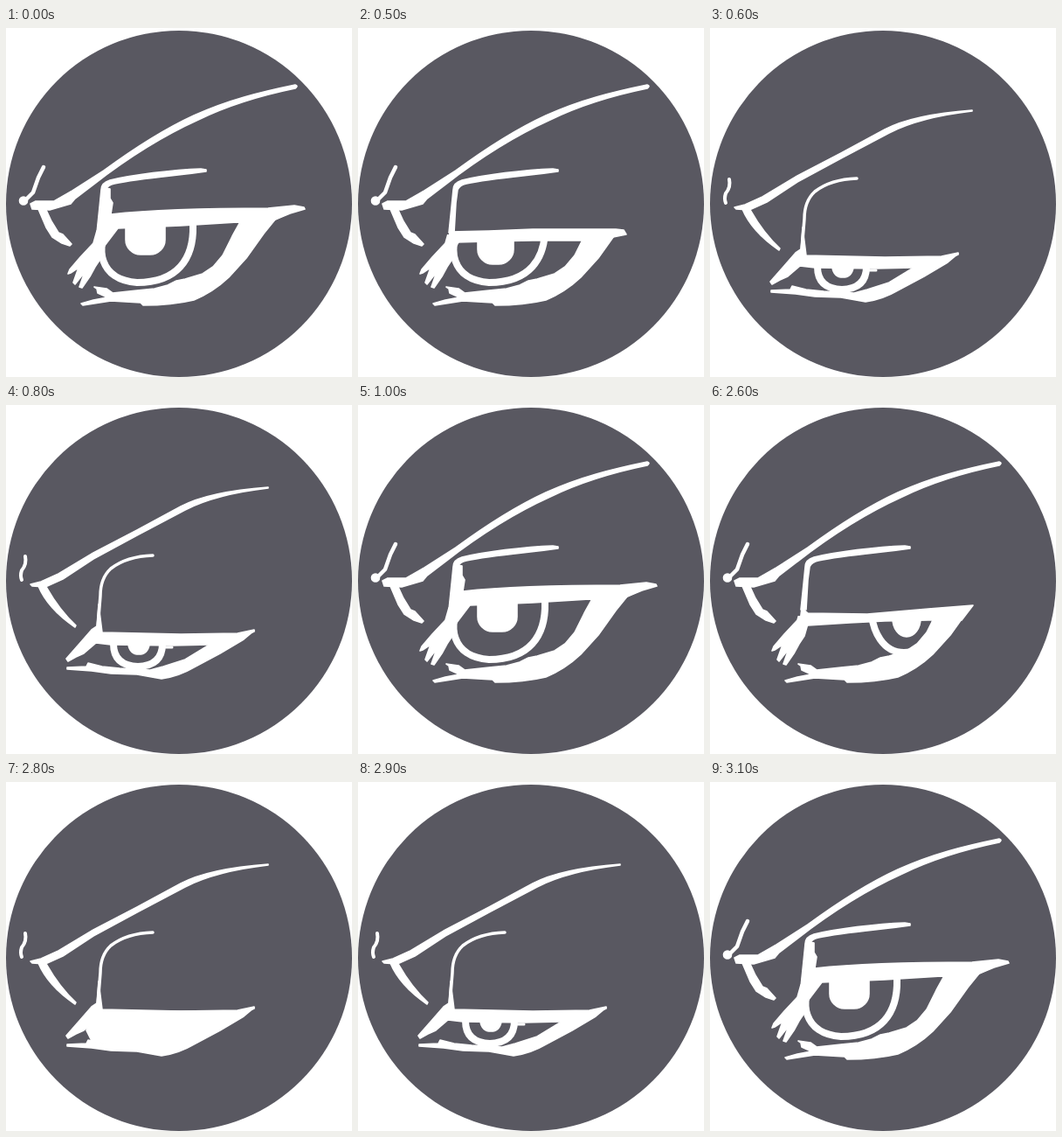
Write an HTML page that moves like this. It is 396 px wide and 399 px high and loops after 4100 ms.

```html
<!DOCTYPE html>
<html lang="en">
<head>
<meta charset="utf-8">
<title>Blinking eye</title>
<style>
  html, body { margin: 0; height: 100%; overflow: hidden; background: #fff; }
  svg { display: block; width: 100vw; height: 100vh; }
  .white { fill: #fff; stroke: #fff; stroke-width: 1.6; stroke-linejoin: round; stroke-linecap: round; }
  .line { fill: none; }
</style>
</head>
<body>
<svg viewBox="0 0 396 399">
  <clipPath id="below"><rect id="edge" width="396" height="399"/></clipPath>
  <circle cx="198" cy="201" r="198" fill="#595861"/>

  <g id="raised" class="white">
    <path class="line" stroke-width="4.500" d="M43 159L37 171L31 188L21 198"/>
    <circle cx="20" cy="197.500" r="4.500"/>
    <path d="M28 201L34 198L55 198L76 186L112 163C142 141 178 117 215 100C255 82 292 73 331 65Q335 66 331 69C292 77 255 88 220 105C180 123 140 148 100 179L79 195L74 201L50 208L30 207Z"/>
    <path d="M37 207L46 228L53 239L64 246L73 249L75 247L65 236L60 234L52 221L46 208Z"/>
    <path d="M229 162L223 161C190 162 145 168 119 174Q109 177 109 185L107 205L104 234H110L112 200L114 185Q116 180 124 178C155 171 195 169 229 164Z"/>
    <g clip-path="url(#below)">
      <path d="M104 232L100 246L85 262L73 276L71 281L74 280L83 274L77 291L79 293L90 279L84 296L87 297L96 284L102 273L108 264L112 250L120 236V214Z"/>
      <path d="M325 211L308 219L295 235L275 263L255 285Q237 302 215 311Q190 317 157 317L154 314L120 312L88 317L86 315L100 311L116 308L105 303L104 298L101 296L115 298L122 303L150 300L170 298L185 294L195 289L205 287L225 281L237 273L248 260L252 252L259 238L269 220Z"/>
      <path id="ring" class="line" stroke-width="8"/>
      <rect id="pupil" y="200" rx="17"/>
    </g>
    <path id="lid"/>
  </g>

  <g id="lowered" class="white">
    <path class="line" stroke-width="4" d="M22 173Q24 182 18 189Q16 195 18 200"/>
    <path d="M28 205L40 202L60 193L100 169L150 143L200 116Q232 99 300 94V95Q240 102 205 120L150 149L100 176L65 199L45 208L30 207Z"/>
    <path d="M37 207Q48 233 79 254L80 252Q62 236 46 208Z"/>
    <path class="line" stroke-width="3.500" d="M168 172Q138 173 120 187Q108 198 108 218L105 255"/>
    <path d="M106 228L104 253L98 257L84 273L69 290L71 293L80 288L89 284L103 272L120 274L190 275L233 274L262 268L284 259V257L265 261L200 262L110 260Z"/>
    <path d="M284 258L272 268L245 284L215 300Q198 310 178 313L150 308L120 307L98 304L70 302V300L92 299L94 295L110 299L130 301L165 303L180 299L205 291L233 274L262 264Z"/>
    <g id="slit">
      <path class="line" stroke-width="8" d="M123 273Q123 298 151 299Q179 298 179 273"/>
      <path d="M140 274Q142 285 152 285Q162 285 164 274Z"/>
      <path class="line" stroke-width="3" d="M180 277H190"/>
    </g>
    <path id="closed" d="M101 262L92 284L98 296L125 301L178 304L235 280L265 262Z"/>
  </g>
</svg>
<script>
const el = id => document.getElementById(id);
const set = (id, attrs) => {
  for (const name in attrs) el(id).setAttribute(name, attrs[name]);
};
const show = (id, on) => set(id, { display: on ? 'inline' : 'none' });
const mix = (a, b, t) => a + (b - a) * t;

const lids = {
  open: [212, 'M110 182L119 184V195L122 200L120 213C165 208 230 206 300 206L330 203L341 205L342 207L325 212L308 219L290 228L265 222L200 226L128 229L112 250L104 240Z'],
  half: [236, 'M105 233L150 232L200 230H295L304 231L307 236L292 239L280 246L255 243L200 243L150 244L113 245L104 250Z'],
  halfSide: [241, 'M105 232L112 238L180 239L250 233L301 229L288 246H250L200 247L160 249L112 252L102 256Z']
};

// Bezier points of the iris outline
const frontRing = [118, 226, 102, 250, 106, 288, 150, 291, 196, 291, 215, 264, 214, 226];
const sideRing = [184, 226, 184, 262, 200, 283, 222, 283, 244, 283, 260, 262, 260, 226];

// [end time, pose, gaze from 0 (front) to 1 (side)]
const poses = [
  [500, 'open', 0], [600, 'half', 0], [700, 'narrow', 0], [800, 'closed', 0],
  [900, 'narrow', 0], [1000, 'half', 0], [1500, 'open', 0], [1600, 'open', .5],
  [2600, 'open', 1], [2700, 'halfSide', 1], [2800, 'narrow', 1], [2900, 'closed', 0],
  [3000, 'narrow', 0], [3100, 'half', 0], [4100, 'open', 0]
];

function draw(now) {
  const time = now % 4100;
  const [, pose, gaze] = poses.find(p => time < p[0]);
  const lid = lids[pose];
  show('raised', lid);
  show('lowered', !lid);
  if (lid) {
    const drop = pose === 'open' ? 0 : mix(11, 16, gaze);
    const [x, y, ...curve] = frontRing.map((n, i) => mix(n, sideRing[i], gaze));
    set('edge', { y: lid[0] });
    set('lid', { d: lid[1] });
    set('ring', { d: `M${x} ${y}C${curve}` });
    set('pupil', {
      x: mix(137, 213, gaze) - drop / 4 * gaze,
      width: mix(drop ? 41 : 45, 32, gaze),
      height: mix(59, 49, gaze) + drop,
      ry: mix(17, 21, gaze)
    });
  } else {
    show('closed', pose === 'closed');
    set('slit', { transform: `translate(${gaze * 38} 0)` });
  }
  requestAnimationFrame(draw);
}
requestAnimationFrame(() => draw(performance.now()));
</script>
</body>
</html>
```
